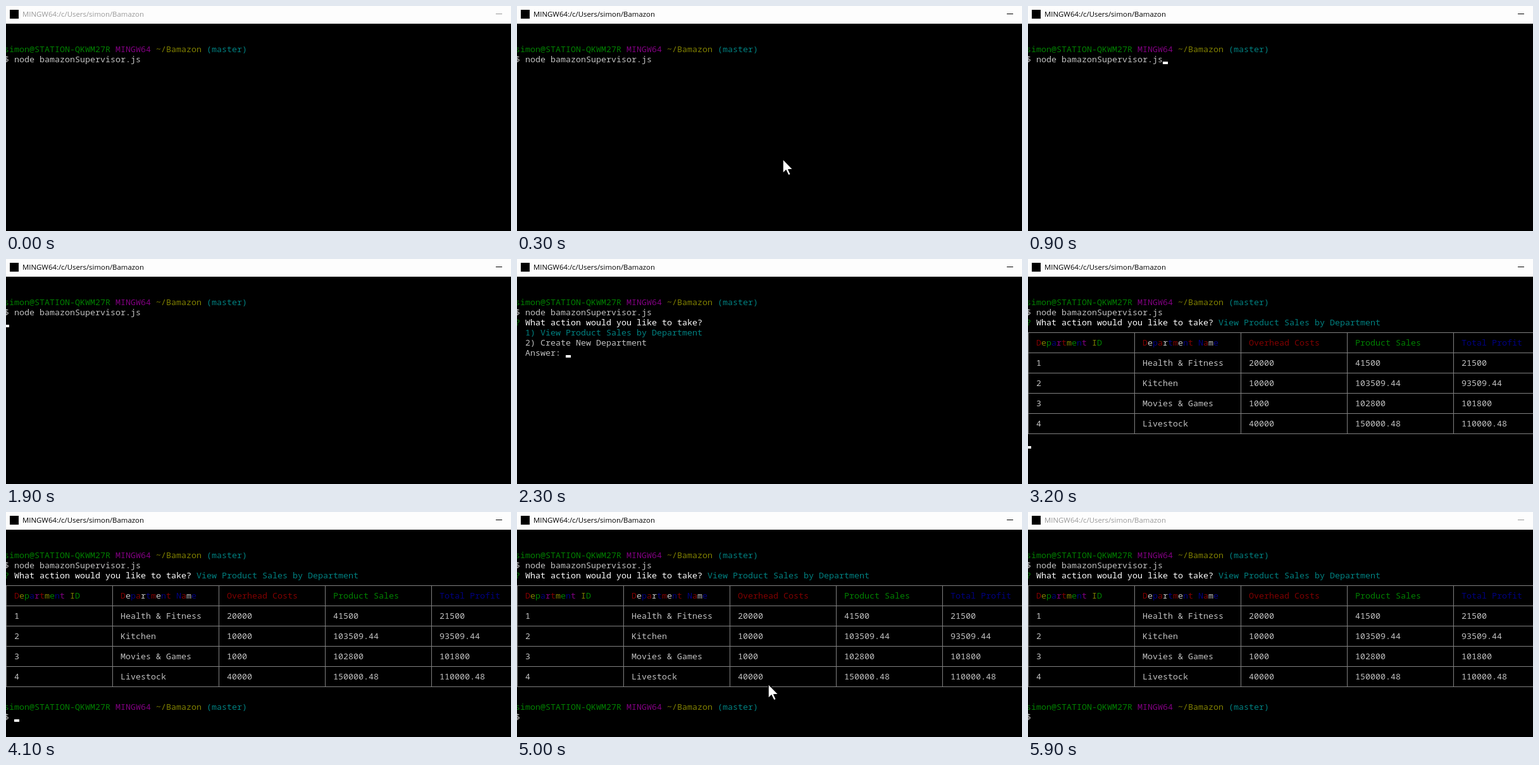
These frames come from a looping animation (798x356 px, 6000 ms). An HTML page with a canvas:

```html
<!DOCTYPE html>
<html lang="en">
<head>
<meta charset="utf-8">
<title>Terminal session</title>
<style>
  html, body { margin: 0; width: 100%; height: 100%; overflow: hidden; background: #000; }
  canvas { display: block; }
</style>
</head>
<body>
<canvas id="stage" width="798" height="356"></canvas>
<script>
const ctx = document.getElementById('stage').getContext('2d');
const LOOP = 6000, STEP = 100, BLINK = 530;
const CELL_W = 8, CELL_H = 16, LEFT = -3, TOP = 28;
const COL_CHARS = 21;
const MONO = '13.333px "Noto Sans Mono", "DejaVu Sans Mono", monospace';
const UI = '11.4px "Open Sans", "Noto Sans", sans-serif';

const RED = '#800000', YELLOW = '#808000', GREEN = '#008000', BLUE = '#000080',
      MAGENTA = '#800080', CYAN = '#008080', SILVER = '#c0c0c0', GREY = '#808080', WHITE = '#fff';
const RAINBOW = [RED, YELLOW, GREEN, BLUE, MAGENTA];
const AMERICA = [RED, SILVER, BLUE];

// Session events in ms
const FOCUS = 100, ENTER = 1200, MENU = 2300, ANSWER = 2900,
      TABLE = 3200, DONE = 3400, BLUR = 5900;

const USER = 'simon';
const HEADERS = [
  ['Department ID', RAINBOW], ['Department Name', AMERICA],
  ['Overhead Costs', [RED]], ['Product Sales', [GREEN]], ['Total Profit', [BLUE]]
];
const DEPARTMENTS = [
  { name: 'Health & Fitness', costs: 20000, sales: 41500 },
  { name: 'Kitchen', costs: 10000, sales: 103509.44 },
  { name: 'Movies & Games', costs: 1000, sales: 102800 },
  { name: 'Livestock', costs: 40000, sales: 150000.48 }
];

let caret;

function rect(x, y, w, h, color) {
  ctx.fillStyle = color;
  ctx.fillRect(x, y, w, h);
}

// Writes text on the character grid and leaves the caret behind it
function put(col, row, str, color) {
  ctx.fillStyle = color;
  ctx.fillText(str, LEFT + col * CELL_W, TOP + row * CELL_H + 13);
  caret = { col: col + str.length, row };
}

function titleBar(active) {
  const color = active ? '#000' : '#999';
  rect(0, 0, 798, 28, '#fdfdfd');
  rect(6, 6, 14, 14, '#000');
  rect(774, 12, 10, 1, color);
  ctx.font = UI;
  ctx.fillStyle = color;
  ctx.fillText('MINGW64:/c/Users/' + USER + '/Bamazon', 26, 17);
}

function prompt(row, command) {
  put(0, row, USER + '@STATION-QKWM27R', GREEN);
  put(22, row, 'MINGW64', MAGENTA);
  put(30, row, '~/Bamazon', YELLOW);
  put(40, row, '(master)', CYAN);
  put(0, row + 1, '$ ' + command, SILVER);
}

function question() {
  put(0, 4, '?', GREEN);
  put(2, 4, 'What action would you like to take?', WHITE);
}

function menu(answer) {
  put(2, 5, '1) View Product Sales by Department', CYAN);
  put(2, 6, '2) Create New Department', SILVER);
  put(2, 7, 'Answer: ' + answer, SILVER);
}

function table() {
  const cellCol = c => 2 + c * COL_CHARS;
  put(38, 4, 'View Product Sales by Department', CYAN);
  for (let i = 0; i < 6; i++) rect(0, 116 + i * 2 * CELL_H, 798, 1, GREY);
  for (let i = 0; i < 5; i++) rect(i * COL_CHARS * CELL_W, 116, 1, 161, GREY);
  HEADERS.forEach(([label, colors], c) =>
    [...label].forEach((ch, i) => put(cellCol(c) + i, 6, ch, colors[i % colors.length])));
  DEPARTMENTS.forEach(({ name, costs, sales }, r) => {
    const profit = Number((sales - costs).toFixed(2));
    [r + 1, name, costs, sales, profit].forEach((value, c) =>
      put(cellCol(c), 8 + r * 2, String(value), SILVER));
  });
}

function drawCaret(t) {
  const blink = Math.floor((t - 825) / BLINK) % 2 === 0;
  const typed = t >= ANSWER && t < TABLE; // a key press flips the blink phase
  if (blink !== typed)
    rect(LEFT + caret.col * CELL_W, TOP + caret.row * CELL_H + 12, CELL_W, 4, WHITE);
}

function arrow(x, y) {
  const points = [[0, 0], [0, 23], [5, 18], [9, 26], [12.5, 24.5], [9, 17], [16, 16.5]];
  ctx.beginPath();
  for (const [dx, dy] of points) ctx.lineTo(x + dx, y + dy);
  ctx.closePath();
  ctx.fillStyle = WHITE;
  ctx.fill();
  ctx.strokeStyle = '#000';
  ctx.lineWidth = 1.5;
  ctx.stroke();
}

// Glides the pointer between two points, resting at either end
function glide(t, start, duration, [x0, y0], [x1, y1]) {
  const p = Math.min(1, Math.max(0, (t - start) / duration));
  arrow(Math.round(x0 + (x1 - x0) * p), Math.round(y0 + (y1 - y0) * p));
}

function draw(t) {
  const active = t >= FOCUS && t < BLUR;
  rect(0, 0, 798, 356, '#000');
  titleBar(active);

  ctx.font = MONO;
  prompt(2, 'node bamazonSupervisor.js');
  if (t >= ENTER) caret = { col: 0, row: 4 };
  if (t >= MENU) question();
  if (t >= MENU && t < TABLE) menu(t >= ANSWER ? '1' : '');
  if (t >= TABLE) {
    table();
    caret = { col: 0, row: 16 };
  }
  if (t >= DONE) prompt(17, '');
  if (active) drawCaret(t);

  if (t >= FOCUS && t < 500) glide(t, FOCUS, 300, [452, 277], [404, 225]);
  if (t >= 4900 && t < 5200) glide(t, 5000, 100, [397, 272], [414, 313]);
}

const start = performance.now();
function tick() {
  const t = (performance.now() - start) % LOOP;
  draw(Math.floor(t / STEP) * STEP);
  requestAnimationFrame(tick);
}
tick();
</script>
</body>
</html>
```
